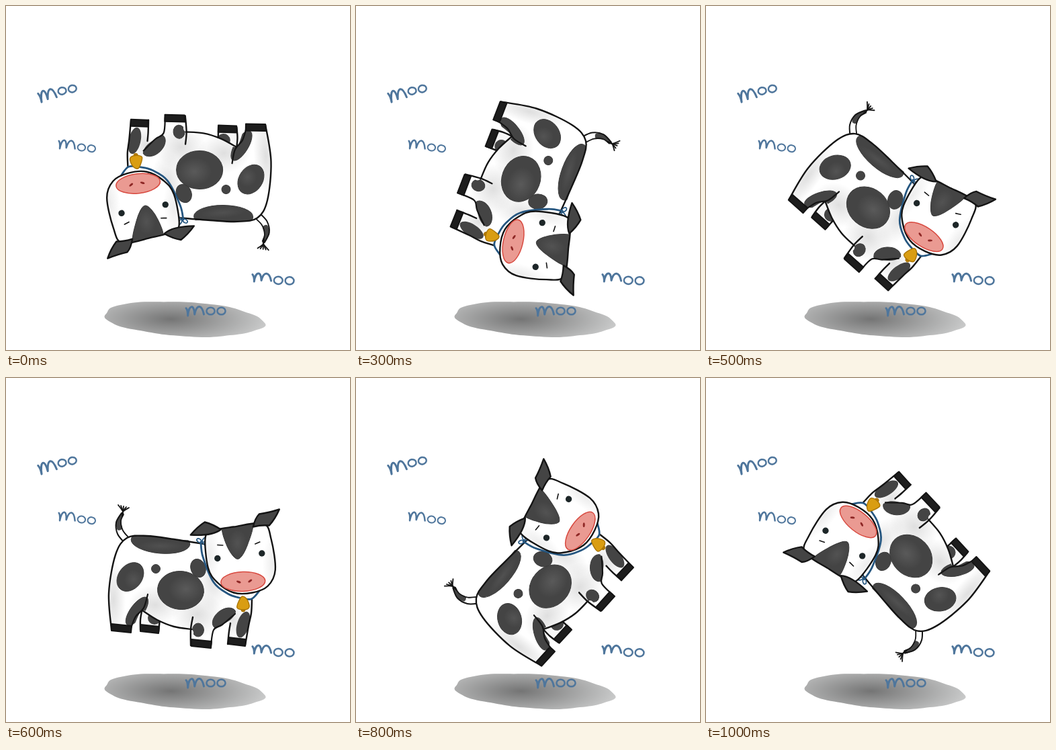
An HTML page with a canvas that plays this animation: 512 px wide and 512 px high, repeating every 1.1 s.

```html
<!DOCTYPE html>
<html lang="en">
<head>
<meta charset="utf-8">
<title>Tumbling cow</title>
<style>
html, body { margin: 0; width: 100%; height: 100%; overflow: hidden; background: #fff; }
canvas { display: block; width: 100vw; height: 100vh; }
</style>
</head>
<body>
<canvas id="stage" width="512" height="512"></canvas>
<script>
const ctx = document.getElementById('stage').getContext('2d');
const INK = '#141414', PATCH = '#444', BLUE = '#4f769c', ROPE = '#255680';
const STEP = 100, STEPS = 11;
const PIVOT = [274, 280];
const rad = deg => deg * Math.PI / 180;

// [angle, pivot x, pivot y] at every second step; the steps between are midway
const keys = [
  [175.5, 277, 281], [139, 280, 282.5], [71.3, 273.6, 278],
  [0, 274, 280], [-53.6, 268.5, 277.5], [-139, 271, 283]
];

function poseAt(step) {
  const a = keys[step >> 1], b = keys[(step + 1) >> 1] || a;
  return a.map((v, i) => (v + b[i]) / 2);
}

const parse = s => s.split(' ').map(p => p.split(',').map(Number));

// smooth curve through all points
function curve(s, closed) {
  const p = parse(s), n = p.length, path = new Path2D();
  const at = i => closed ? p[(i + n) % n] : p[Math.max(0, Math.min(n - 1, i))];
  path.moveTo(...p[0]);
  for (let i = 0; i < (closed ? n : n - 1); i++) {
    const [a, b, c, d] = [at(i - 1), at(i), at(i + 1), at(i + 2)];
    path.bezierCurveTo(
      b[0] + (c[0] - a[0]) / 6, b[1] + (c[1] - a[1]) / 6,
      c[0] - (d[0] - b[0]) / 6, c[1] - (d[1] - b[1]) / 6, c[0], c[1]);
  }
  if (closed) path.closePath();
  return path;
}

const poly = s => new Path2D('M' + s + 'Z');

function oval(x, y, rx, ry, deg = 0) {
  const path = new Path2D();
  path.ellipse(x, y, rx, ry, rad(deg), 0, Math.PI * 2);
  return path;
}

function fill(path, color) {
  ctx.fillStyle = color;
  ctx.fill(path);
}

function line(path, color = INK, width = 2.4) {
  ctx.strokeStyle = color;
  ctx.lineWidth = width;
  ctx.stroke(path);
}

const lineThru = (s, color, width) => line(curve(s), color, width);

function shape(path, color, edge = INK, width = 2.4) {
  fill(path, color);
  line(path, edge, width);
}

function local(x, y, deg, draw) {
  ctx.save();
  ctx.translate(x, y);
  ctx.rotate(rad(deg));
  draw();
  ctx.restore();
}

function clipped(path, draw) {
  ctx.save();
  ctx.clip(path);
  draw();
  ctx.restore();
}

function glow(x, y, rx, ry, gray, alpha) {
  local(x, y, 0, () => {
    ctx.scale(rx, ry);
    const g = ctx.createRadialGradient(0, 0, 0, 0, 0, 1);
    g.addColorStop(0, `rgba(${gray},${gray},${gray},${alpha})`);
    g.addColorStop(1, `rgba(${gray},${gray},${gray},0)`);
    ctx.fillStyle = g;
    ctx.fillRect(-1, -1, 2, 2);
  });
}

const body = curve('180,238 210,235 250,240 300,248 345,290 341,351 309,375 305,396 277,393 276,374 225,360 203,346 186,373 158,371 153,320 163,263', true);
const farFront = curve('310,335 366,326 362,365 356,394 332,392 333,366', true);
const farHind = curve('203,346 201,373 226,375 229,360', true);
const head = curve('298,239 312,229 340,224 384,219 396,243 402,288 391,312 368,322 340,322 316,307 302,285', true);
const bell = curve('352,325 359,330 362,341 354,345 344,342 347,331', true);

const spots = [
  [230, 244, 44, 17, 5], [286, 283, 11, 14, -20], [185, 296, 23.5, 17.5, -52],
  [223, 284, 6.5, 6.5], [260, 316, 34.5, 28.5, 5], [195, 347, 25, 10, -54],
  [286, 375, 8.5, 10], [325, 358, 20, 13, -38]
].map(s => oval(...s));

const hoof = (x, y, w) => shape(poly(`${x},${y} l${w},3 l-1,10 l${1 - w},-3`), '#1d1d1d', INK, 2);

function drawTail() {
  fill(curve('177,246 166,232 164,215 172,201 171,213 174,227 184,239', true), '#fff');
  fill(curve('166,226 164,214 172,200 175,203 171,213 173,224', true), PATCH);
  lineThru('177,246 166,232 164,215 172,201', INK, 2);
  lineThru('184,239 174,227 171,213 175,203', INK, 1.8);
  for (let i = 0; i < 5; i++)
    lineThru(`173,206 174,199 ${167 + 4 * i},${189 + i}`, INK, 1.8);
}

function drawFarLegs() {
  fill(farHind, '#f7f7f7');
  clipped(farHind, () => fill(oval(221, 357, 10, 10), PATCH));
  lineThru('202,347 200,360 200,375');
  lineThru('227,378 228,368 229,360');
  hoof(200, 367, 28);

  fill(farFront, '#fbfbfb');
  clipped(farFront, () => {
    glow(338, 360, 16, 24, 120, .2);
    fill(oval(353, 367, 9, 20, 17), PATCH);
  });
  lineThru('334,365 332,377 330,396');
  lineThru('366,330 365,350 361,369 356,398');
  hoof(331, 386, 26);
}

function drawBody() {
  fill(body, '#fff');
  clipped(body, () => {
    glow(222, 338, 40, 30, 110, .22);
    glow(285, 352, 38, 34, 110, .22);
    glow(160, 330, 18, 60, 110, .22);
    glow(308, 300, 24, 48, 110, .2);
    spots.forEach(s => shape(s, PATCH, '#3a3a3a', 1));
    glow(268, 314, 26, 21, 140, .3);
    glow(190, 300, 14, 15, 130, .25);
    glow(230, 250, 34, 8, 130, .2);
  });
  lineThru('157,375 153,320 163,263 180,238 210,235 250,240 300,248');
  lineThru('186,372 193,355 205,342 211,322', INK, 2.2);
  lineThru('203,346 225,360 250,370 276,374');
  lineThru('278,356 275,374 275,398');
  lineThru('305,398 309,375 322,367 341,351', INK, 2.2);
  hoof(157, 366, 30);
  hoof(276, 389, 30);
}

function drawHead() {
  fill(head, '#fff');
  clipped(head, () => {
    glow(304, 265, 15, 42, 130, .14);
    glow(398, 280, 15, 45, 130, .14);
    shape(curve('325,218 329,250 346,272 361,250 367,214', true), PATCH, '#3a3a3a', 1);
    glow(346, 248, 14, 20, 140, .2);
  });
  line(head);
  shape(oval(354, 305.5, 33, 14.5, -2), '#ea9a92', '#d8493f', 1.5);
  fill(oval(347.5, 306, 3.4, 1.5, 20), '#8e2725');
  fill(oval(364.5, 304.5, 3.4, 1.5, -35), '#8e2725');

  fill(oval(316, 271, 4.7, 4.7), '#1d2628');
  fill(oval(382, 263.5, 4.7, 4.7), '#1d2628');
  lineThru('316,251 324,251.5', INK, 1.6);
  lineThru('372,249.5 379,246.5', INK, 1.6);

  shape(poly('276,236 Q286,224 297,217 Q309,220 321,228 Q308,238 276,236'), PATCH);
  shape(poly('369,224 Q372,211 378,205 Q392,203 408,198 Q402,212 393,222 Q381,221 369,224'), PATCH);
}

function drawTrim() {
  lineThru('290,244 293,266 309,304 330,321 347,327 365,329 377,317', ROPE, 2.8);
  line(oval(287.5, 242, 4, 2.5, 40), ROPE, 1.7);
  line(oval(295, 241, 4, 2, -55), ROPE, 1.7);
  lineThru('292,245 296,249 299,253', ROPE, 1.6);
  shape(oval(353, 345, 3, 3), '#b47a05', '#a97404', 1);
  shape(bell, '#d99d12', '#a97404', 1.4);
}

function drawCow([deg, x, y]) {
  local(x, y, deg, () => {
    ctx.translate(-PIVOT[0], -PIVOT[1]);
    drawTail();
    drawFarLegs();
    drawBody();
    drawTrim();
    local(-1.2, -2.5, 0, drawHead);
  });
}

// a flat ellipse with an uneven brushed rim
function drawShadow() {
  const rim = new Path2D();
  for (let a = 0; a < Math.PI * 2; a += .05) {
    const r = 1 + .018 * Math.sin(5 * a + 1) + .01 * Math.sin(11 * a);
    const x = 119 * r * Math.cos(a), y = 25.5 * r * Math.sin(a);
    rim.lineTo(265 + x, 466 + y + x * .055);
  }
  fill(rim, '#c9caca');
  clipped(rim, () => glow(245, 466, 145, 42, 95, .8));
}

// handwritten: two arches for the m, then two rings
function moo(x, y, tilt, w, h, ringY, pen) {
  local(x, y, tilt, () => {
    const m = new Path2D();
    m.moveTo(0, h * .2);
    m.quadraticCurveTo(w * .1, h * .4, w * .1, h);
    m.bezierCurveTo(w * .15, -h * .2, w * .46, -h * .25, w * .48, h * .85);
    m.bezierCurveTo(w * .6, -h * .25, w * .88, -h * .2, w, h * .85);
    line(m, BLUE, pen);
    for (const k of [1.38, 1.98])
      line(oval(w * k, ringY, w * .23, w * .2), BLUE, pen - .5);
  });
}

function drawMoos() {
  moo(47, 127, -12, 26, 17, 7, 3);
  moo(79, 198, 6, 25, 14, 9, 2.5);
  moo(367, 397, 2, 28, 13, 10, 3);
  moo(268, 447, 0, 26.5, 14, 7, 3);
}

function frame(now) {
  const step = Math.floor(now / STEP) % STEPS;
  ctx.fillStyle = '#fff';
  ctx.fillRect(0, 0, 512, 512);
  ctx.lineCap = ctx.lineJoin = 'round';
  drawShadow();
  drawMoos();
  drawCow(poseAt(step));
}

const start = performance.now();
function tick() {
  frame(performance.now() - start);
  requestAnimationFrame(tick);
}
tick();
</script>
</body>
</html>
```
